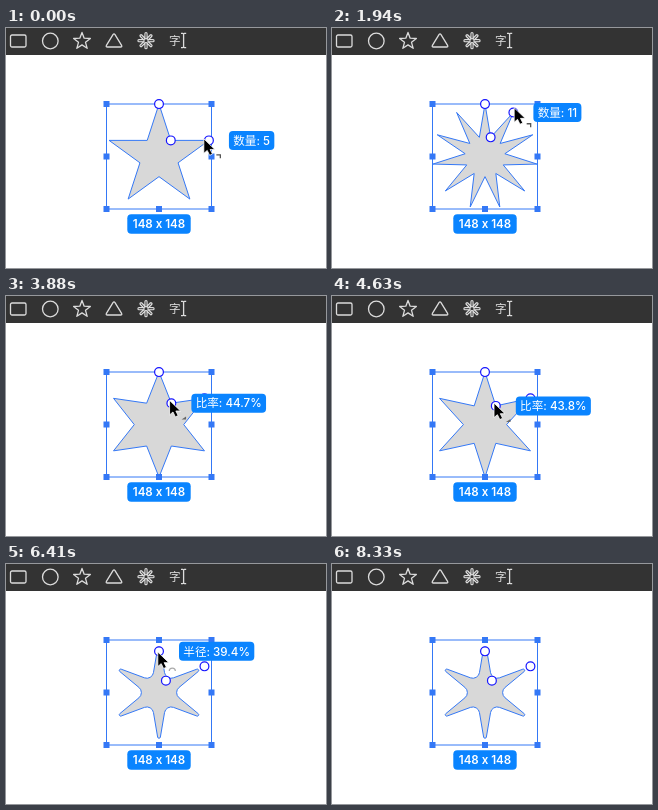
Write an HTML page that moves like this. It is 320 px wide and 240 px high and loops after 8770 ms.

```html
<!DOCTYPE html>
<html lang="zh">
<head>
<meta charset="utf-8">
<title>Star tool</title>
<style>
  html, body { margin: 0; width: 100%; height: 100%; overflow: hidden; background: #fff; }
  svg { display: block; }
  text { font: 500 11.6px Inter, "Noto Sans CJK SC", "Noto Sans CJK", sans-serif; fill: #fff; }
  .icons { fill: none; stroke: #dcdcdc; stroke-width: 1.3; stroke-linejoin: round; }
  .knob { fill: #fff; stroke: #1414ff; stroke-width: 1.2; }
  .tag { fill: #0a84ff; }
</style>
</head>
<body>
<svg width="320" height="240" viewBox="0 0 320 240">
  <rect width="320" height="27" fill="#333"/>
  <g class="icons">
    <rect x="4.5" y="7" width="15.5" height="12" rx="1.5"/>
    <circle cx="44.3" cy="13" r="7.8"/>
    <path id="starIcon"/>
    <path d="M107 6.6Q108 5 109 6.6L115.6 17.4Q116.3 19 114.6 19H101.4Q99.7 19 100.4 17.4Z"/>
    <path id="burst" stroke-width="3.3" stroke-linecap="round"/>
    <path id="burstCore" stroke="#333" stroke-width="1" stroke-linecap="round"/>
    <path d="M175 5.3h1.6l1 .8 1-.8h1.6M175 19.7h1.6l1-.8 1 .8h1.6M177.6 6v13"/>
  </g>
  <text x="163" y="17" style="fill:#dcdcdc">字</text>

  <path id="star" fill="#d8d8d8" stroke="#3478f6"/>
  <rect x="100.5" y="76" width="105" height="105" fill="none" stroke="#3478f6"/>
  <path id="grips" fill="#3478f6"/>
  <rect class="tag" x="121.3" y="186.2" width="63.4" height="19.5" rx="4"/>
  <text x="153" y="200.3" text-anchor="middle" style="font-weight:600">148 x 148</text>

  <circle class="knob" id="topKnob" r="4.4"/>
  <circle class="knob" id="innerKnob" r="4.4"/>
  <circle class="knob" id="pointKnob" r="4.4"/>
  <g id="cursor">
    <path d="M0 0V14.5L3.4 11.6L5.8 16.5L8.6 15.2L6.3 10.6H11Z" stroke="#fff" stroke-width=".8"/>
    <path id="hint" transform="translate(14.5 17.5)" stroke-width="1.3"/>
  </g>
  <g id="tip">
    <rect class="tag" id="tipBox" height="19" rx="4"/>
    <text id="tipText" x="4.3" y="13.8"></text>
  </g>
</svg>
<script>
const LOOP = 8770, STEP = 148.7;
const CX = 153, CY = 128.6, R = 52.5;
const $ = id => document.getElementById(id);
const set = (id, attrs) => { for (const k in attrs) $(id).setAttribute(k, attrs[k]); };

const clamp = x => Math.min(1, Math.max(0, x));
const mix = (a, b, x) => a + (b - a) * x;
const smooth = (n, from, to) => {
  const x = clamp((n - from) / (to - from));
  return x * x * (3 - 2 * x);
};
// Eases through [step, value] key points
const glide = (n, keys) => keys.reduce(
  (value, [at, to], i) => i ? mix(value, to, smooth(n, keys[i - 1][0], at)) : to, 0);

const polar = (r, turn, x = CX, y = CY) =>
  [x + r * Math.sin(turn * 2 * Math.PI), y - r * Math.cos(turn * 2 * Math.PI)];

// The three drags: round the star for the count, in and out for the ratio, down for the radius
const turnAt = n => glide(n, [[0, .19], [6, .32], [8, .3], [13, .0857], [15, .16]]);
const countAt = n => Math.floor(1 / turnAt(n));
const ratioAt = n => glide(n, [[24, 38.2], [28, 56], [34, 26.3]]);
const radiusAt = n => glide(n, [[39, 0], [44, 44], [47, 22], [48.76, 39.5]]);

const percent = v => +v.toFixed(1) + "%";
const tools = [
  { from: -9, to: 19, lag: .36, label: n => "数量: " + countAt(n),
    hint: { d: "M-2 -1.5H2V2", fill: "none", stroke: "#555" } },
  { from: 18.8, to: 36, lag: .36, label: n => "比率: " + percent(ratioAt(n)),
    hint: { d: "M-2.5 1.5L2 -1.5V1.5Z", fill: "#666", stroke: "none" } },
  { from: 35, to: 53, lag: 0, label: n => "半径: " + percent(radiusAt(n)),
    hint: { d: "M-3 1.5A3 3 0 0 1 3 1.5", fill: "none", stroke: "#aaa" } }
];

// Each corner is cut by the same length and joined with an arc
function starPath(count, ratio, round, x = CX, y = CY, r = R) {
  const total = count * 2;
  const pts = Array.from({ length: total }, (_, i) => polar(i % 2 ? r * ratio : r, i / total, x, y));
  const edge = Math.hypot(pts[0][0] - pts[1][0], pts[0][1] - pts[1][1]);
  const cut = round * edge / 2;
  const d = pts.map((p, i) => {
    if (!cut) return p.join(" ");
    const toward = q => [(q[0] - p[0]) / edge, (q[1] - p[1]) / edge];
    const u = toward(pts[(i + total - 1) % total]), v = toward(pts[(i + 1) % total]);
    const rho = cut * Math.tan(Math.acos(u[0] * v[0] + u[1] * v[1]) / 2);
    const at = w => `${p[0] + w[0] * cut} ${p[1] + w[1] * cut}`;
    return `${at(u)}A${rho} ${rho} 0 0 ${1 - i % 2} ${at(v)}`;
  });
  return "M" + d.join("L") + "Z";
}

// The pointer rides on each knob in turn, then leaves the stage
function cursorAt(n, inner, top) {
  const turn = turnAt(n);
  const start = polar(Math.max(48, 64 - 83 * turn), turn);
  const stops = [
    [17, 20, inner[0] - 1.8, inner[1] - 2.8],
    [34, 37, top[0] - 1.2, top[1] + .7],
    [51, 56, 285, 262]
  ];
  return stops.reduce(([px, py], [from, to, x, y]) => {
    const s = smooth(n, from, to);
    return [mix(px, x, s), mix(py, y, s)];
  }, start);
}

function draw(n) {
  const count = countAt(n), ratio = ratioAt(n) / 100, radius = radiusAt(n);
  const point = polar(R, 1 / count);
  const inner = polar(R * ratio, .5 / count);
  const top = [CX, CY - R + radius * .285];
  const knobs = [point, inner, top];
  ["pointKnob", "innerKnob", "topKnob"].forEach((id, i) => set(id, { cx: knobs[i][0], cy: knobs[i][1] }));
  set("star", { d: starPath(count, ratio, radius / 100) });

  const tool = tools.filter(t => n > t.from).pop();
  const [x, y] = knobs[tools.indexOf(tool)];
  const fade = clamp(Math.min(n - tool.from, tool.to - n) / 2);
  $("tipText").textContent = tool.label(n - tool.lag);
  set("tipBox", { width: $("tipText").getComputedTextLength() + 8.6 });
  set("tip", { transform: `translate(${x + 20} ${y - 9.5})`, opacity: fade });

  set("cursor", { transform: `translate(${cursorAt(n, inner, top)})` });
  set("hint", { ...tool.hint, opacity: fade > .2 ? 1 : 0 });
}

const spokes = Array.from({ length: 8 }, (_, i) =>
  `M${polar(3, i / 8, 140, 12.7)}L${polar(7, i / 8, 140, 12.7)}`).join("");
set("burst", { d: spokes });
set("burstCore", { d: spokes });
set("starIcon", { d: starPath(5, .42, 0, 76, 13.2, 8.8) });
set("grips", {
  d: [-1, 0, 1].flatMap(i => [-1, 0, 1].map(j =>
    i || j ? `M${150 + i * R} ${125.5 + j * R}h6v6h-6z` : "")).join("")
});

let last = -1;
function tick() {
  const n = Math.floor(performance.now() % LOOP / STEP);
  if (n !== last) draw(last = n);
  requestAnimationFrame(tick);
}
tick();
</script>
</body>
</html>
```
